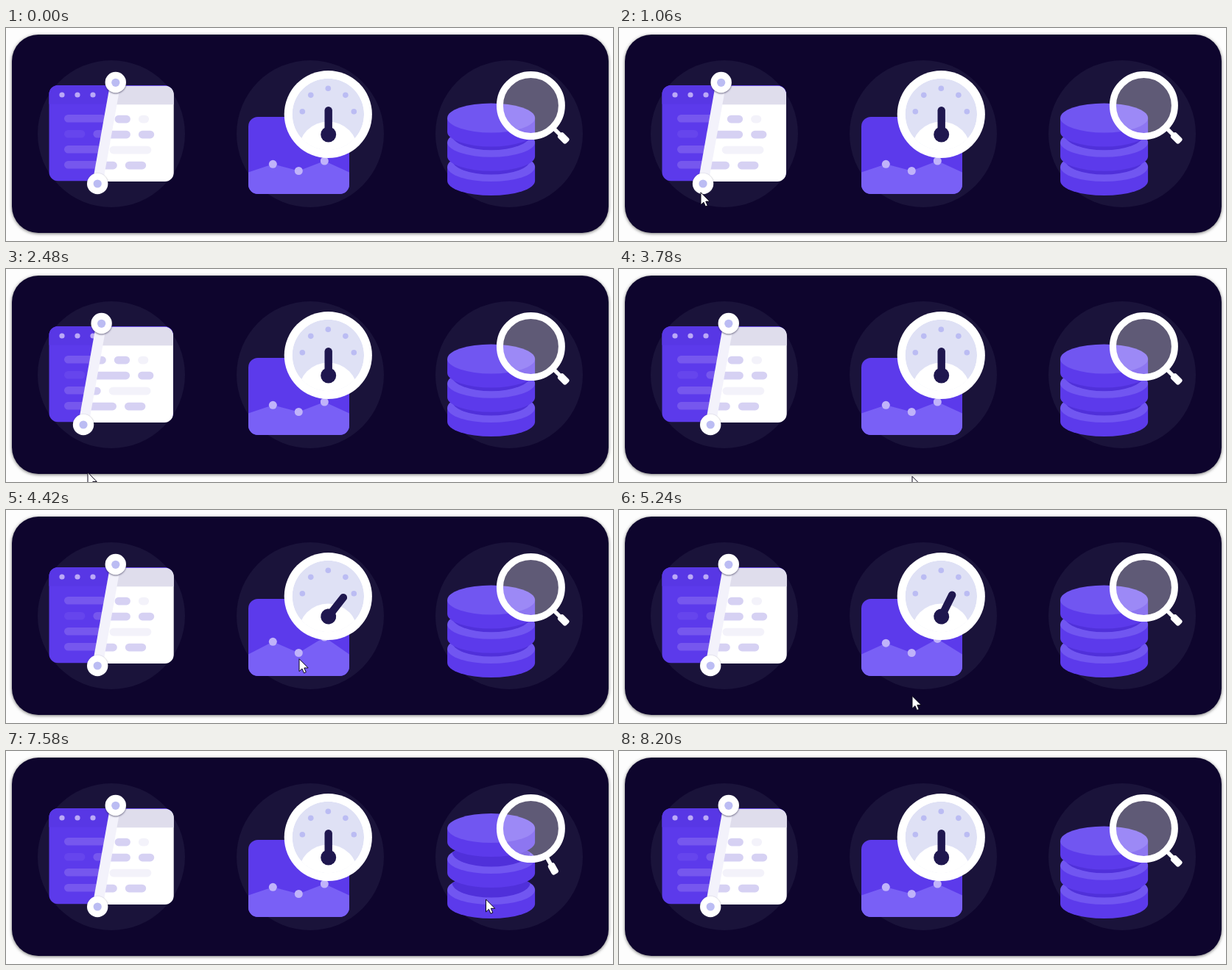
Recreate the animation shown at these times as an HTML page. Size 824 by 290 pixels, loop 8.92 s.

```html
<!DOCTYPE html>
<html lang="en">
<head>
<meta charset="utf-8">
<title>Hover icons</title>
<style>
  html, body { margin: 0; width: 100%; height: 100%; overflow: hidden; background: #fdfdfd; }
  svg { display: block; width: 824px; height: 290px; }
  .card { fill: #0e052d; filter: drop-shadow(0 1.5px 2px rgba(0, 0, 0, .55)); }
  .halo { fill: #1a133a; }
  .body { fill: #5c3aeb; }
  .face { fill: #7156f1; }
  .shade { fill: #5030da; }
  .light { fill: #fff; }
  .knob { fill: #fff; filter: drop-shadow(0 1.8px 1px rgba(40, 35, 70, .65)); }
  .mark { fill: #bbbcf3; }
</style>
</head>
<body>
<svg viewBox="0 0 824 290">
  <defs>
    <clipPath id="reveal"><path id="revealEdge" d="M151.5 60H300V225H121.6Z"/></clipPath>
    <clipPath id="windowClip"><rect x="58.5" y="78" width="168.4" height="130.3" rx="12"/></clipPath>
    <clipPath id="chartClip"><rect x="329" y="121" width="137" height="105" rx="13"/></clipPath>
    <clipPath id="dialClip"><circle cx="437.3" cy="117.5" r="48.7"/></clipPath>
    <clipPath id="faceClip"><ellipse rx="59.5" ry="20"/></clipPath>
  </defs>

  <rect class="card" x="8" y="9" width="810" height="270" rx="36"/>
  <g id="halos" class="halo"></g>

  <g id="compare">
    <g clip-path="url(#windowClip)">
      <path class="body" d="M58 78H228V209H58Z"/>
      <path fill="#5837e5" d="M58 78H228V103.5H58Z"/>
      <g id="buttons" fill="#bba9f7"></g>
      <g id="darkRows"></g>
    </g>
    <g clip-path="url(#reveal)">
      <g id="lightWindow">
        <g clip-path="url(#windowClip)">
          <path class="light" d="M58 78H228V209H58Z"/>
          <path fill="#dfddec" d="M58 78H228V103.5H58Z"/>
          <g id="lightRows"></g>
        </g>
      </g>
    </g>
    <g id="slider">
      <path d="M148.8 74L124.2 212" stroke="#f3f2fb" stroke-width="14"/>
      <circle class="knob" cx="148.8" cy="74" r="14.2"/>
      <circle class="knob" cx="124.2" cy="212" r="14.2"/>
      <circle class="mark" cx="148.8" cy="74.3" r="5.6"/>
      <circle class="mark" cx="124.2" cy="212" r="5.6"/>
    </g>
  </g>

  <g id="gauge">
    <g clip-path="url(#chartClip)">
      <path class="body" d="M329 121H466V226H329Z"/>
      <path id="area" fill="#7960f6"/>
    </g>
    <g id="points" fill="#c0b3fa"></g>
    <circle class="light" cx="437.3" cy="117.5" r="59.6"/>
    <g clip-path="url(#dialClip)">
      <circle fill="#dfe1f5" cx="437.3" cy="117.5" r="48.7"/>
      <circle class="light" cx="437.3" cy="168" r="40.5"/>
    </g>
    <g id="ticks" class="mark"></g>
    <g id="needle" fill="#1f174f">
      <circle cx="437.7" cy="145" r="10.5"/>
      <rect x="432.5" y="107" width="10.4" height="40" rx="5.2"/>
    </g>
  </g>

  <g id="database"></g>
  <g id="lens">
    <circle cx="712.4" cy="105.5" r="40" fill="#fff" fill-opacity=".3"/>
    <circle cx="712.4" cy="105.5" r="42" fill="none" stroke="#fff" stroke-width="9"/>
    <g id="handle">
      <path d="M44 0H60" stroke="#fff" stroke-width="5.5"/>
      <rect class="light" x="55" y="-5" width="15.5" height="10" rx="3"/>
    </g>
  </g>

  <path id="cursor" d="M0 0V17L3.9 13.4L6.5 19.3L9.3 18.1L6.8 12.3H12.2Z" fill="#fff" stroke="#0b0618"/>
</svg>
<script>
const LOOP = 8920;
const $ = id => document.getElementById(id);

const add = (parent, tag, attrs = {}) => {
  const node = document.createElementNS('http://www.w3.org/2000/svg', tag);
  for (const key in attrs) node.setAttribute(key, attrs[key]);
  return parent.appendChild(node);
};
const move = (node, x, y) => node.setAttribute('transform', `translate(${x} ${y})`);

for (let i = 0; i < 3; i++) {
  add($('halos'), 'circle', { cx: 143 + 270 * i, cy: 144, r: 100 });
  add($('buttons'), 'circle', { cx: 76 + 21 * i, cy: 91, r: 3.6 });
}

for (let i = -2; i <= 2; i++) {
  const angle = i * 42 * Math.PI / 180;
  add($('ticks'), 'circle', {
    cx: 437.3 + 35.2 * Math.sin(angle), cy: 117.5 - 35.2 * Math.cos(angle), r: 3.8
  });
}

// Pill lengths in units, negative for a faint pill
const rows = [[8, 3, -2], [-4, 7, 3], [7, -8], [10, 4]];
function drawRows(parent, color, faintColor) {
  rows.forEach((row, i) => {
    let x = 79;
    for (const length of row) {
      const width = Math.abs(length) * 7.1;
      add(parent, 'rect', {
        x, y: 118 + i * 21, width, height: 10.6, rx: 5.3, fill: length < 0 ? faintColor : color
      });
      x += width + 11;
    }
  });
}
drawRows($('darkRows'), '#7657ee', '#6645ed');
drawRows($('lightRows'), '#d6d1f3', '#f3f2fa');

// Chart points: height at rest, rise on hover
const chart = [[185.3, 6], [194.5, 0], [181, 8]];
const points = chart.map(() => add($('points'), 'circle', { r: 5.5 }));

// Disks from bottom to top
const disks = [0, 1, 2].map(i => {
  const node = add($('database'), 'g');
  add(node, 'path', { class: 'body', d: 'M-59.5 0V19A59.5 20 0 0 0 59.5 19V0Z' });
  add(node, 'ellipse', { class: 'face', rx: 59.5, ry: 20 });
  if (i < 2) {
    const shadow = add(node, 'g', { 'clip-path': 'url(#faceClip)' });
    add(shadow, 'ellipse', { class: 'shade', cy: -9.5, rx: 53, ry: 20 });
  }
  return node;
});

// Pointer visits; each icon eases back during the last moments of its visit
const [ENTER, DELAY, HOVER] = [740, 285, 360];
const visits = [
  { x: 111, enter: 660, leave: 1790, end: 2700 },
  { x: 398, enter: 3740, leave: 4930, end: 5490 },
  { x: 651.5, enter: 6620, leave: 7580, end: 8200 }
];

const clamp = v => Math.min(1, Math.max(0, v));
const easeOut = p => Math.sin(p * Math.PI / 2);
const easeInOut = p => p * p * (3 - 2 * p);

const hover = (t, { enter, end }) =>
  clamp((t - enter - DELAY) / HOVER) - clamp((t - end + HOVER) / HOVER);

function placeCursor(t) {
  const visit = visits.find(v => t >= v.enter && t < v.end);
  $('cursor').style.display = visit ? '' : 'none';
  if (!visit) return;
  const { x, enter, leave, end } = visit;
  const arrived = easeOut(clamp((t - enter) / ENTER));
  const left = easeInOut(clamp((t - leave) / (end - leave)));
  move($('cursor'), x, 290 - 88 * (arrived - left));
}

function render(t) {
  const [slide, turn, lift] = visits.map(v => hover(t, v));

  move($('slider'), -31.5 * slide, 0);
  move($('revealEdge'), -31.5 * slide, 0);
  move($('lightWindow'), .8 * (1 - clamp(slide * 3)), .8);

  $('needle').setAttribute('transform', `rotate(${38 * turn} 437.7 145)`);
  const line = chart.map(([y, rise], i) => {
    const [cx, cy] = [362.3 + 35 * i, y - rise * turn];
    move(points[i], cx, cy);
    return `L${cx} ${cy}`;
  }).join('');
  $('area').setAttribute('d', `M329 196.5${line}L466 196.5V226H329Z`);

  disks.forEach((disk, i) => move(disk, 658.6, 189 - i * (33.3 + 8.65 * lift)));
  $('handle').setAttribute('transform', `translate(712.4 105.5) rotate(${45 + 16 * lift})`);

  placeCursor(t);
}

const start = performance.now();
function tick() {
  render((performance.now() - start) % LOOP);
  requestAnimationFrame(tick);
}
tick();
</script>
</body>
</html>
```
